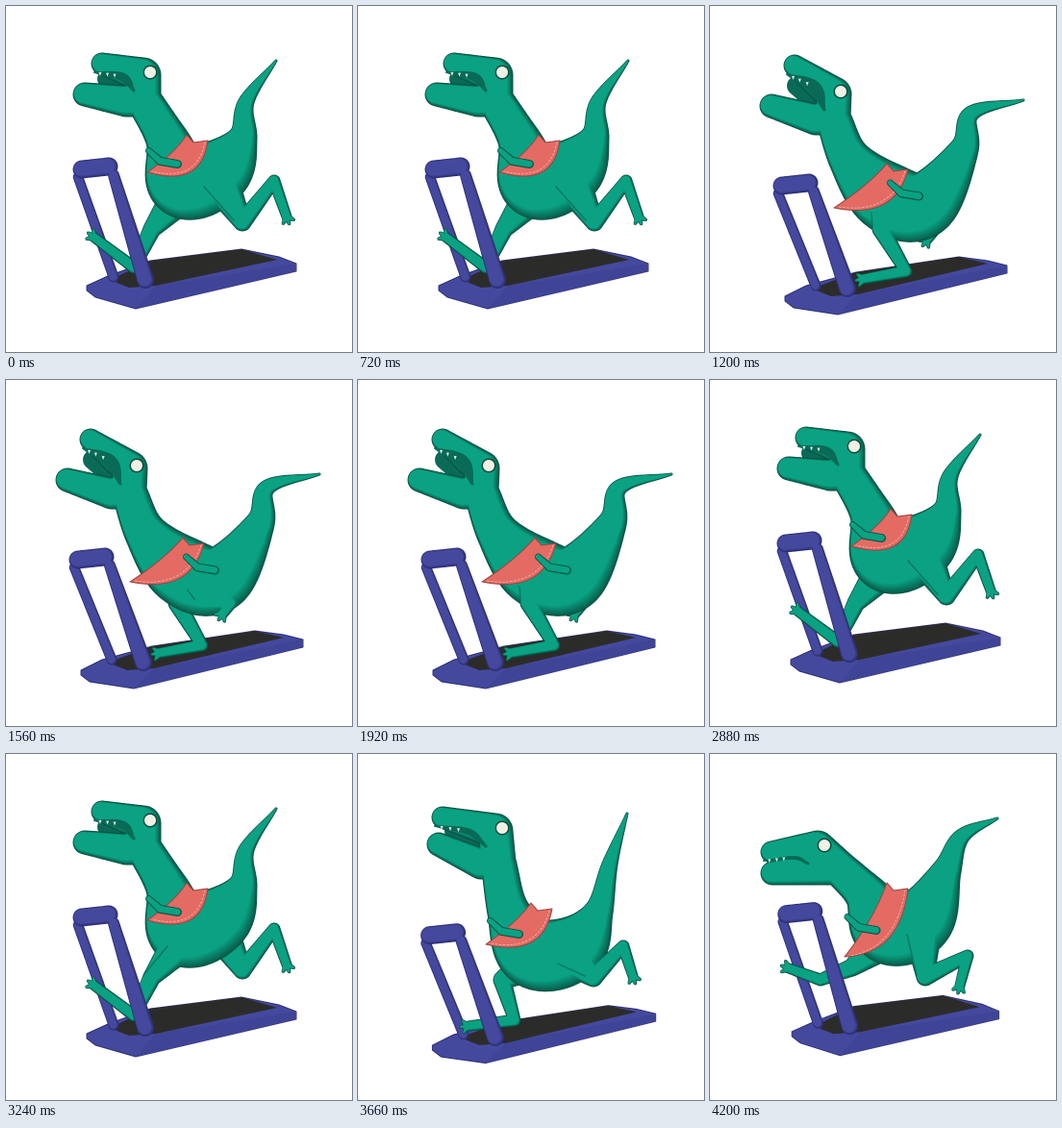
An HTML page with a canvas for the animation above (4.26 s loop, 360 by 360 pixels).

```html
<!DOCTYPE html>
<html lang="en">
<head>
<meta charset="utf-8">
<title>Dinosaur on a treadmill</title>
<style>
html, body { margin: 0; width: 100%; height: 100%; overflow: hidden; background: #fff; }
canvas { display: block; width: 100vw; height: 100vh; object-fit: contain; }
</style>
</head>
<body>
<canvas id="stage" width="720" height="720"></canvas>
<script>
const ctx = document.getElementById('stage').getContext('2d');
const STEP = 60, FRAMES = 71, STRIDE = 12;
const TEAL = [10, 162, 131], DARK_TEAL = [8, 96, 78];
const BLUE = [69, 73, 158], NAVY = [46, 49, 118];
const PINK = '#e36b64', RUST = '#9b4541', INK = '#0b4a3e', MOUTH = '#086a57';

// Spine: tail tip, tail, tail base, hip, chest, neck, throat. Head: skull, snout, chin.
// Cape: its two ends. Ride: how far the treadmill sinks, how far the arm swings back.
const contact = {
  spine: [281,57, 250,100, 246,138, 222,172, 184,184, 168,140, 143,97],
  head: [143,72, 100,60, 82,92], cape: [147,173, 210,140], ride: [0, 0]
};
const down = {
  spine: [280,62, 262,115, 250,165, 224,202, 182,207, 157,165, 146,112],
  head: [143,80, 88,66, 84,94], cape: [133,198, 202,161], ride: [1.1, 0]
};
const pass = {
  spine: [326,98, 272,112, 264,150, 224,206, 184,199, 146,160, 128,116],
  head: [129,92, 88,62, 64,104], cape: [129,210, 206,170], ride: [1, 50]
};
const push = {
  spine: [299,67, 262,86, 246,122, 221,172, 185,182, 163,147, 134,118],
  head: [112,98, 64,102, 65,124], cape: [140,211, 206,140], ride: [-0.2, 0]
};
const SPINE_RADII = [1, 8, 15, 33, 36, 22, 18];
const LEG_RADII = [20, 9, 6, 5];

const mix = (a, b, k = 0.5) => a.map((v, i) => v + (b[i] - v) * k);
const blend = (a, b) =>
  Object.fromEntries(Object.keys(a).map(key => [key, mix(a[key], b[key])]));
const pairs = list => list.flatMap((v, i) => i % 2 ? [] : [[v, list[i + 1]]]);
const add = ([x, y], dx, dy) => [x + dx, y + dy];
const rgb = c => `rgb(${c.map(Math.round)})`;
const clamp = v => Math.max(0, Math.min(1, v));

// Gaps in a cycle become the mean of their neighbours.
const cycle = (keys, mean) => keys.map((key, i) =>
  key || mean(keys[i - 1], keys[(i + 1) % keys.length]));

const bodies = cycle([contact, down, pass, null, push, null], blend);
// Knee, ankle and toe over a whole stride; the other leg runs half a stride later.
const legs = cycle([
  [152,232, 133,272, 92,241], [150,235, 163,277, 115,283], [178,232, 204,276, 160,284], null,
  [224,232, 268,210, 260,241], null, [246,225, 279,182, 292,219], [245,233, 276,200, 286,231],
  [205,230, 234,232, 226,243], null, [148,222, 115,235, 82,223], null
], mix);

const withRadii = (points, radii) => points.map((p, i) => [...p, radii[i]]);

// Circles [x, y, r] strung along a bent or straight line of points.
function tube(points, smooth = false) {
  const last = points.length - 1, discs = [];
  for (let i = 0; i < last; i++) {
    const b = points[i], c = points[i + 1];
    const a = points[i - 1] || mix(c, b, 2), d = points[i + 2] || mix(b, c, 2);
    const steps = Math.ceil(Math.hypot(c[0] - b[0], c[1] - b[1]) / 1.5) + 1;
    for (let s = 0; s <= steps; s++) {
      const t = s / steps;
      const bend = smooth ? t * (1 - t) / 2 : 0;
      discs.push(b.map((v, j) => v + (c[j] - v) * t
        + bend * ((1 - t) * (2 * v - a[j] - c[j]) + t * (2 * c[j] - v - d[j]))));
    }
  }
  return discs;
}

function paint(discs, color, grow = 0, scale = 1, shift = 0) {
  ctx.fillStyle = color;
  ctx.beginPath();
  for (const [x, y, size] of discs) {
    const r = Math.max(0.5, size * scale + grow);
    const cx = x - size * shift, cy = y - size * shift * 0.7;
    ctx.moveTo(cx + r, cy);
    ctx.arc(cx, cy, r, 0, 7);
  }
  ctx.fill();
}

// Light comes from the upper left, so paler layers shrink towards it.
function model(discs, light, dark, ink) {
  paint(discs, ink, 0.5);
  for (let k = 0; k <= 6; k++) {
    paint(discs, rgb(mix(dark, light, k / 6)), -0.2, 1 - k * 0.03, k * 0.022);
  }
}

function line(points, color, width, dash = []) {
  ctx.beginPath();
  ctx.moveTo(...points[0]);
  if (points.length === 3) ctx.quadraticCurveTo(...points[1], ...points[2]);
  else ctx.lineTo(...points[1]);
  ctx.strokeStyle = color;
  ctx.lineWidth = width;
  ctx.setLineDash(dash);
  ctx.stroke();
  ctx.setLineDash([]);
}

function polygon(points, color, ink) {
  ctx.beginPath();
  points.forEach(p => ctx.lineTo(...p));
  ctx.closePath();
  ctx.fillStyle = color;
  ctx.fill();
  if (!ink) return;
  ctx.strokeStyle = ink;
  ctx.lineWidth = 1;
  ctx.stroke();
}

function legPoints(list, spine) {
  const [knee, ankle, toe] = pairs(list);
  const hip = spine[3], chest = spine[4];
  const k = clamp((knee[0] - chest[0]) / (hip[0] - chest[0]));
  return [add(mix(chest, hip, k), 0, 10), knee, ankle, toe];
}

function legDiscs(points) {
  const [, , ankle, toe] = points;
  const aim = Math.atan2(toe[1] - ankle[1], toe[0] - ankle[0]);
  const toes = [-0.8, 0, 0.8].flatMap(turn => {
    const tip = add(toe, 8 * Math.cos(aim + turn), 8 * Math.sin(aim + turn));
    return tube([[...toe, 3.5], [...tip, 1.2]]);
  });
  return [...tube(withRadii(points, LEG_RADII)), ...toes];
}

function drawBody(pose, nearLeg) {
  const spine = pairs(pose.spine);
  const [skull, snout, chin] = pairs(pose.head);
  const throat = spine[6], hinge = add(throat, -18, 2);
  const gape = (chin[1] - snout[1] - 18) / 4;
  const inside = add(mix(snout, chin), 14, 0);
  const leg = legPoints(nearLeg, spine);

  paint(tube([[...inside, 10], [...throat, 10]]), MOUTH);
  model([
    ...tube(withRadii(spine, SPINE_RADII), true),
    ...tube([[...throat, 18], [...skull, 18], [...snout, 11]]),
    ...tube([[...throat, 18], [...hinge, 16], [...chin, 12]]),
    ...legDiscs(leg)
  ], TEAL, DARK_TEAL, INK);
  line([add(leg[0], -16, 6), add(leg[1], -9, -2)], 'rgba(8, 80, 66, .5)', 1.5);

  // Mouth, teeth and eye hang on the skull and snout.
  const lips = tube([
    [...add(snout, -8, 9), 1], [...add(mix(skull, snout), 0, 8), gape + 1],
    [...add(skull, -10, 16), 1.5]
  ], true);
  paint(lips, MOUTH);
  for (const k of [0.12, 0.25, 0.38]) {
    const [x, y] = lips[Math.floor(lips.length * k)];
    polygon([[x - 1.5, y - 1], [x + 1.5, y - 1], [x, y + 3]], '#e9ecdf');
  }
  const eye = add(skull, 7, -3);
  paint([[...eye, 7.5]], INK);
  paint([[...eye, 6]], '#eff1e4');
}

function drawCape({ cape, ride }) {
  const [left, right] = pairs(cape);
  const mid = mix(left, right);
  const top = add(mid, -2, -4), hem = add(mid, 25, 33);
  ctx.beginPath();
  ctx.moveTo(...left);
  ctx.quadraticCurveTo(...top, ...add(right, -22, -6));
  ctx.lineTo(...add(right, -15, 2));
  ctx.lineTo(...right);
  ctx.quadraticCurveTo(...hem, ...left);
  ctx.fillStyle = PINK;
  ctx.fill();
  ctx.strokeStyle = RUST;
  ctx.lineWidth = 1;
  ctx.stroke();
  line([add(right, -3, 2), add(hem, -5, -6), add(left, 5, -1)], '#f3b5ad', 0.8, [2, 2]);

  const elbow = add(mid, ride[1], 8);
  const arm = tube([[...elbow, 4], [...add(elbow, -18, -3), 4], [...add(elbow, -30, -14), 3]]);
  model(arm, TEAL, DARK_TEAL, INK);
}

function treadmill(sink) {
  const at = (x, y, dx, dy) => [x + dx * sink, y + dy * sink];
  const top = (x, y, r) => [...at(x, y, -4, 17), r];
  const foot = (x, y, r) => [...at(x, y, -2, 9), r];
  const left = at(84, 291, -6, 11), front = at(135, 315, -2, 6), right = at(302, 268, 7, 2);
  const backLeft = at(150, 265, 2, 12), back = at(245, 253, 14, 8);
  const lip = foot(156, 291);
  return {
    deck: [left, at(106, 281, -6, 10), backLeft, back, at(284, 261, 5, 4), right,
      add(right, 0, 8), front, add(left, 9, 12), add(left, 0, 5)],
    belt: [foot(108, 285).slice(0, 2), backLeft, back, at(282, 264, 7, 4), lip.slice(0, 2),
      foot(128, 293).slice(0, 2)],
    side: [lip.slice(0, 2), right, add(right, 0, 8), front],
    post: tube([top(75, 178, 4.8), foot(112, 282, 5)]),
    front: [...tube([top(79, 170, 9), top(107, 167, 9)]),
      ...tube([top(112, 176, 5.5), foot(145, 285, 8.5)])]
  };
}

function draw(phase) {
  const pose = bodies[phase % 6];
  const gear = treadmill(pose.ride[0]);
  ctx.setTransform(2, 0, 0, 2, 0, 0);
  ctx.fillStyle = '#fff';
  ctx.fillRect(0, 0, 360, 360);
  ctx.lineJoin = ctx.lineCap = 'round';

  polygon(gear.deck, rgb(BLUE), rgb(NAVY));
  polygon(gear.side, rgb(mix(BLUE, NAVY, 0.2)));
  polygon(gear.belt, '#2b2c2a');
  model(gear.post, BLUE, NAVY, rgb(NAVY));

  model(legDiscs(legPoints(legs[phase], pairs(pose.spine))), TEAL, DARK_TEAL, INK);
  drawBody(pose, legs[(phase + STRIDE / 2) % STRIDE]);
  drawCape(pose);
  model(gear.front, BLUE, NAVY, rgb(NAVY));
}

let shown = -1;
const start = performance.now();
function tick() {
  const frame = Math.floor((performance.now() - start) / STEP) % FRAMES;
  if (frame !== shown) draw((shown = frame) % STRIDE);
  requestAnimationFrame(tick);
}
tick();
</script>
</body>
</html>
```
